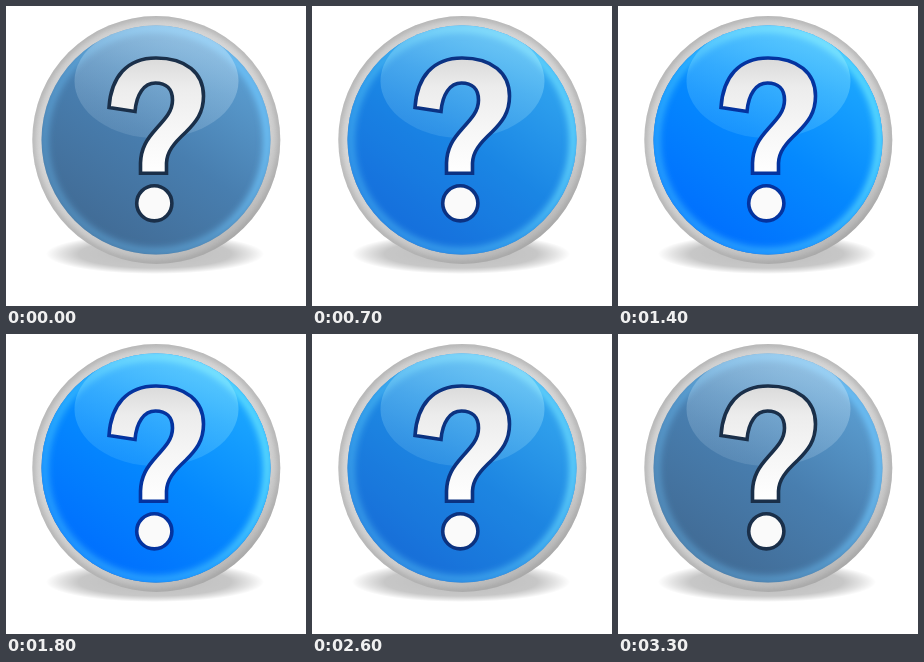
Recreate the animation shown at these times as an HTML page. Size 300 by 300 pixels, loop 3400 ms.

```html
<!DOCTYPE html>
<html lang="en">
<head>
<meta charset="utf-8">
<title>Help button</title>
<style>
  html, body { margin: 0; width: 100%; height: 100%; overflow: hidden; background: #fff; }
  svg { display: block; width: 100vw; height: 100vh; }
</style>
</head>
<body>
<svg viewBox="0 0 300 300" id="stage">
  <defs>
    <linearGradient id="rim" x1="0.25" y1="0" x2="0.75" y2="1">
      <stop offset="0" stop-color="#d0d0d0"/>
      <stop offset="0.35" stop-color="#d8d8d8"/>
      <stop offset="0.7" stop-color="#cecece"/>
      <stop offset="1" stop-color="#b4b4b4"/>
    </linearGradient>
    <linearGradient id="paper" x1="0" y1="0" x2="0" y2="1">
      <stop offset="0" stop-color="#dadada"/>
      <stop offset="0.25" stop-color="#ececec"/>
      <stop offset="0.6" stop-color="#f6f6f6"/>
      <stop offset="1" stop-color="#fff"/>
    </linearGradient>
    <radialGradient id="shade">
      <stop offset="0" stop-color="#000" stop-opacity="0.26"/>
      <stop offset="0.7" stop-color="#000" stop-opacity="0.22"/>
      <stop offset="0.86" stop-color="#000" stop-opacity="0.11"/>
      <stop offset="1" stop-color="#000" stop-opacity="0"/>
    </radialGradient>
    <filter id="soft" x="-20%" y="-20%" width="140%" height="140%">
      <feGaussianBlur stdDeviation="3"/>
    </filter>
    <clipPath id="disc"><circle cx="150" cy="134" r="114.5"/></clipPath>
    <clipPath id="ring"><circle cx="150.3" cy="134" r="124"/></clipPath>
    <path id="hook" d="M103 101.5 C105 71 121 52 150 52 C180 52 197.500 67 197.500 90
      C197.500 107 190 116 180 126 C167 138 161 146 160.500 157 V167.300 H134.500
      V157 C135 142 141 133 150 123 C160 112 166.500 105 166.500 94
      C166.500 83 160 77 149.500 77 C138 77 130.500 88 129 105.500 Z"/>
  </defs>
  <ellipse cx="149" cy="248" rx="109" ry="20" fill="url(#shade)"/>
  <circle cx="150.300" cy="134" r="124" fill="url(#rim)"/>
  <g clip-path="url(#ring)">
    <circle cx="150.300" cy="134" r="124" fill="none" stroke="#8c8c8c" stroke-width="3" filter="url(#soft)"/>
  </g>
</svg>
<script>
const stage = document.getElementById("stage");
const STEP = 100, STEPS = 34, TOP = 15, HOLD_END = 17;

const dull = { low: "#416b95", mid: "#487eaf", high: "#5c9fd2", glow: "#6cc0f6", gloss: "#d4eaf8", ink: "#1a2f49" };
const vivid = { low: "#0070ff", mid: "#058aff", high: "#1eaaff", glow: "#5cdcff", gloss: "#a0f0ff", ink: "#0434a0" };

function face(id, c) {
  return `
  <defs>
    <linearGradient id="${id}Body" x1="0.22" y1="0.9" x2="0.78" y2="0.1">
      <stop offset="0" stop-color="${c.low}"/>
      <stop offset="0.5" stop-color="${c.mid}"/>
      <stop offset="1" stop-color="${c.high}"/>
    </linearGradient>
    <linearGradient id="${id}Glow" x1="0.1" y1="0.8" x2="0.9" y2="0.3">
      <stop offset="0" stop-color="${c.glow}" stop-opacity="0.4"/>
      <stop offset="0.5" stop-color="${c.glow}" stop-opacity="0.5"/>
      <stop offset="1" stop-color="${c.glow}"/>
    </linearGradient>
    <linearGradient id="${id}Gloss" x1="0.75" y1="0" x2="0.4" y2="1">
      <stop offset="0" stop-color="${c.gloss}" stop-opacity="0.5"/>
      <stop offset="0.5" stop-color="${c.gloss}" stop-opacity="0.27"/>
      <stop offset="1" stop-color="${c.gloss}" stop-opacity="0.13"/>
    </linearGradient>
  </defs>
  <g id="${id}">
    <circle cx="150" cy="134" r="114.5" fill="url(#${id}Body)"/>
    <g clip-path="url(#disc)">
      <circle cx="150" cy="134" r="111.5" fill="none" stroke="url(#${id}Glow)" stroke-width="8" filter="url(#soft)"/>
      <ellipse cx="150.5" cy="75" rx="82" ry="57" fill="url(#${id}Gloss)"/>
    </g>
    <g fill="url(#paper)" stroke="${c.ink}" stroke-width="3.6">
      <use href="#hook"/>
      <circle cx="148.3" cy="197.3" r="17.600" fill="#fafafa"/>
    </g>
  </g>`;
}

stage.insertAdjacentHTML("beforeend", face("dull", dull) + face("vivid", vivid));
const bright = document.getElementById("vivid");

// Colour strength rises, holds at its peak, then falls.
function strength(step) {
  const x = step <= HOLD_END ? Math.min(1, step / TOP)
                             : (STEPS - 1 - step) / (STEPS - 1 - HOLD_END);
  return Math.sin(x * Math.PI / 2);
}

function draw() {
  const step = Math.floor(performance.now() / STEP) % STEPS;
  bright.setAttribute("opacity", strength(step).toFixed(3));
  requestAnimationFrame(draw);
}
draw();
</script>
</body>
</html>
```
